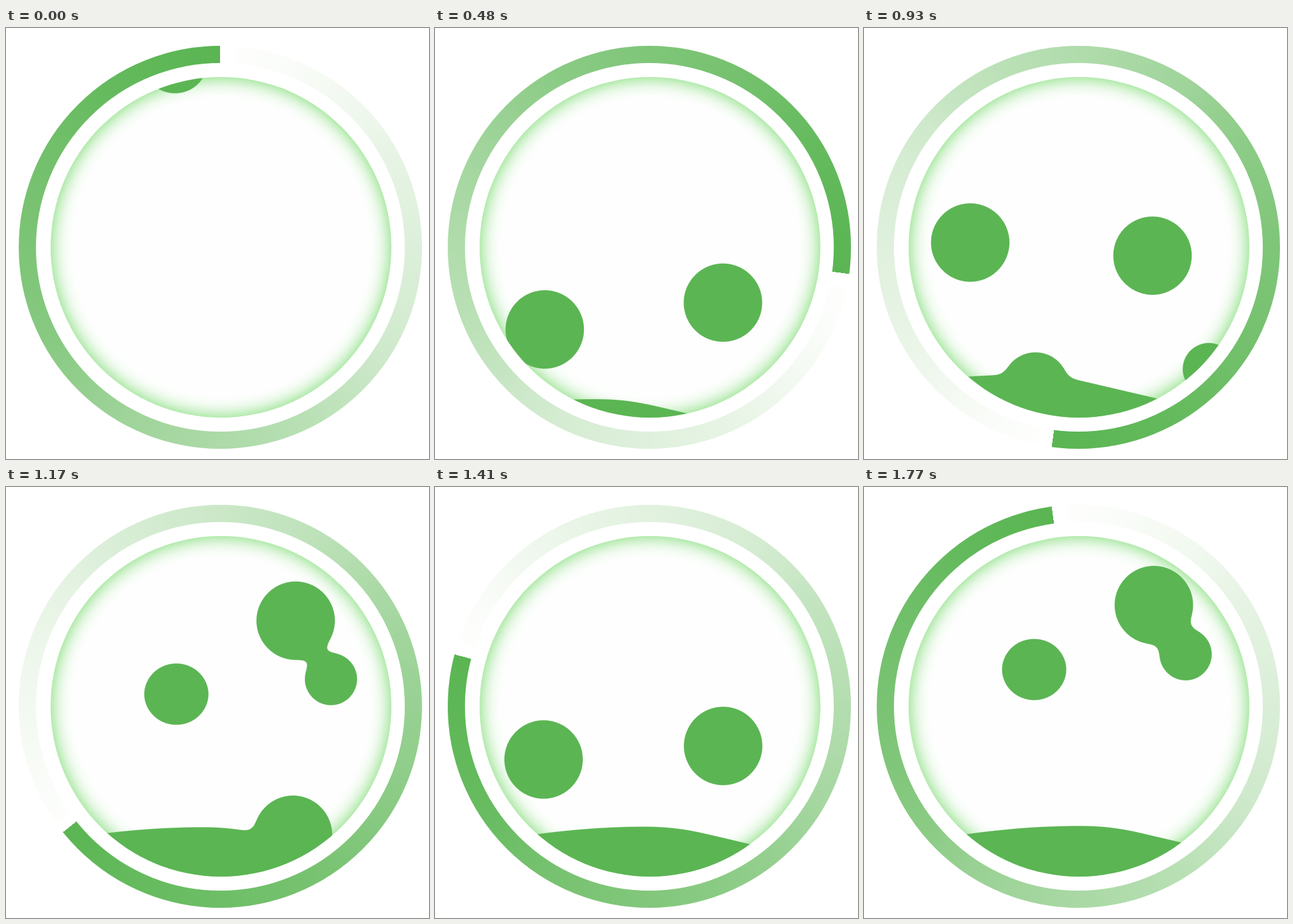
These frames come from a looping animation (664 by 677 pixels, 1.8 s). An HTML page with a canvas:

```html
<!DOCTYPE html>
<html lang="en">
<head>
<meta charset="utf-8">
<title>Filling loader</title>
<style>
  html, body { margin: 0; width: 100%; height: 100%; overflow: hidden; background: #fff; }
  canvas, svg { position: absolute; left: 0; top: 0; width: 664px; height: 677px; }
  #glass {
    position: absolute; left: 70px; top: 77px; width: 535px; height: 535px;
    border-radius: 50%; background: #fefefe; box-shadow: inset 0 0 30px #6bd75f;
  }
</style>
</head>
<body>
<canvas id="ring" width="664" height="677"></canvas>
<div id="glass"></div>
<svg viewBox="0 0 664 677">
  <defs>
    <clipPath id="disc"><circle cx="337.5" cy="344.5" r="267.5"/></clipPath>
    <filter id="goo" filterUnits="userSpaceOnUse" x="0" y="-60" width="664" height="800" color-interpolation-filters="sRGB">
      <feGaussianBlur stdDeviation="9"/>
      <feColorMatrix values="0 0 0 0 .355  0 0 0 0 .71  0 0 0 0 .325  0 0 0 20 -9.5"/>
    </filter>
  </defs>
  <g clip-path="url(#disc)">
    <g id="lava" filter="url(#goo)"><path id="pool"/></g>
  </g>
</svg>
<script>
const LOOP = 1800, STEP = 30, FRAMES = LOOP / STEP;
const lava = document.getElementById('lava');
const pool = document.getElementById('pool');
const ctx = document.getElementById('ring').getContext('2d');

// Place at release, speed per step and radii.
const DROPS = [
  { x: 265.3, y: 54.5, vx: 0.3, vy: 38.7, rx: 51.2, ry: 48.8 },
  { x: 142.7, y: -254.5, vx: 1.85, vy: 45.5, rx: 62.2, ry: 62.2 },
  { x: 456.8, y: 37.8, vx: -0.3, vy: 24.6, rx: 62.2, ry: 62.2 },
  { x: 473.7, y: 28.8, vx: 5.2, vy: 39, rx: 42, ry: 42 }
];
const RELEASES = [0, 18, 32, 53];
const WHITE = [255, 255, 254], GREEN = [90, 181, 82];
const GAP = 3.2 / 360;

const balls = RELEASES.flatMap(start => DROPS.map(drop => {
  const el = document.createElementNS('http://www.w3.org/2000/svg', 'ellipse');
  el.setAttribute('rx', drop.rx);
  el.setAttribute('ry', drop.ry);
  lava.append(el);
  return { el, start, drop };
}));

function shade(u) {
  const k = u - 0.04 * Math.sin(2 * Math.PI * u);
  return `rgb(${WHITE.map((w, i) => w + (GREEN[i] - w) * k).join()})`;
}

// Angle of a point that runs evenly along the sides of a square.
function squareAngle(deg) {
  const axis = Math.round(deg / 90) * 90;
  return axis + Math.atan((deg - axis) / 45) * 180 / Math.PI;
}

function drawRing(head) {
  const from = squareAngle(head);
  const sweep = ctx.createConicGradient((from - 90) * Math.PI / 180, 336.5, 344.5);
  const add = (u, color) => {
    const at = (squareAngle(head + u * 360) - from) / 360;
    sweep.addColorStop(Math.min(1, Math.max(0, at)), color);
  };
  add(0, '#fff');
  add(GAP, '#fff');
  add(GAP, shade(GAP));
  for (let i = 1; i <= 60; i++) add(i / 60, shade(i / 60));
  ctx.clearRect(0, 0, 664, 677);
  ctx.strokeStyle = sweep;
  ctx.lineWidth = 27;
  ctx.beginPath();
  ctx.arc(336.5, 344.5, 303, 0, Math.PI * 2);
  ctx.stroke();
}

// The pool fills fast, then hardly rises while its crest drifts right.
function drawPool(n) {
  const top = Math.max(624 - 2.57 * n, 538.2 - 0.1 * n);
  const crest = 255 + 90 * (1 - Math.exp(-Math.max(0, n - 31) / 8));
  const bend = 89, slope = 0.235;
  let d = 'M-40 800';
  for (let x = -40; x <= 704; x += 8) {
    const s = x - crest;
    const dip = s < 0 ? 0.0004 * s * s
      : s < bend ? slope * s * s / (2 * bend)
      : slope * (s - bend / 2);
    d += `L${x} ${(top + dip).toFixed(2)}`;
  }
  pool.setAttribute('d', d + 'L704 800Z');
}

function drawBalls(n) {
  for (const { el, start, drop } of balls) {
    const age = n - start;
    const drag = 0.9 * Math.max(0, age - 18) ** 2;
    el.setAttribute('cx', drop.x + drop.vx * age);
    el.setAttribute('cy', drop.y + drop.vy * age - drag);
    el.style.display = age < 0 || age > 28 ? 'none' : '';
  }
}

const begin = performance.now();
function draw() {
  const n = Math.floor((performance.now() - begin) % LOOP / STEP);
  drawRing(n / FRAMES * 360);
  drawPool(n);
  drawBalls(n);
  requestAnimationFrame(draw);
}
draw();
</script>
</body>
</html>
```
